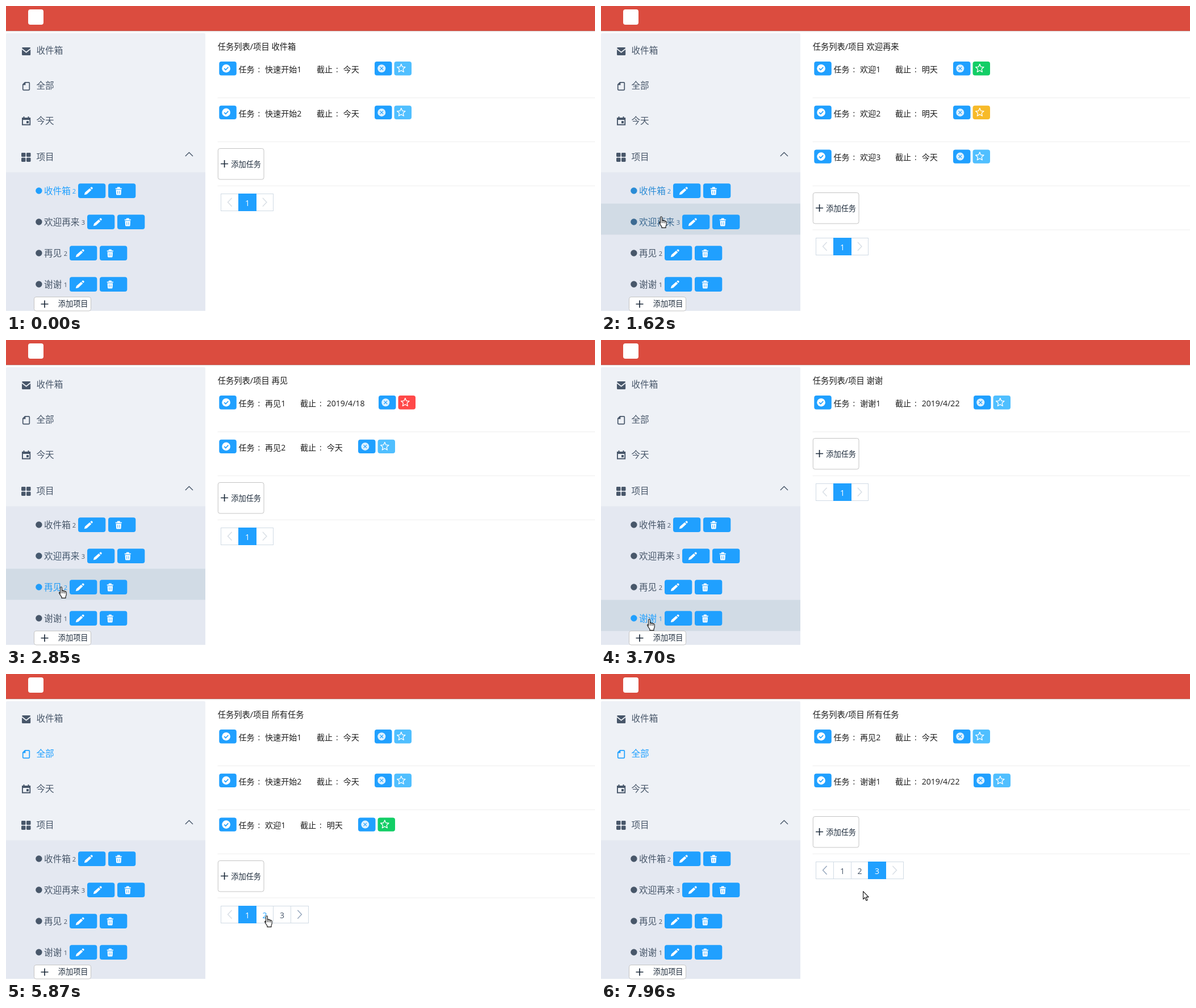
These frames come from a looping animation (1037 by 540 pixels, 8000 ms). An HTML page:

```html
<!DOCTYPE html>
<html lang="zh-CN">
<head>
<meta charset="utf-8">
<title>任务列表</title>
<style>
html, body { margin: 0; width: 100%; height: 100%; overflow: hidden; background: #fff; }
svg { display: block; width: 1037px; height: 540px; }
text { font: 14.1px "Open Sans", "Noto Sans CJK SC", "Noto Sans CJK", sans-serif; white-space: pre; }
.title { font-size: 14.3px; }
.side { font-size: 15.6px; font-weight: 300; }
.count { font-size: 11px; }
.button { font-size: 13.2px; }
</style>
</head>
<body>
<svg id="stage" viewBox="0 0 1037 540" lang="zh-CN"></svg>
<script>
const LOOP = 8000;
const BLUE = '#20a0ff', LIGHT = '#4db3ff', SLATE = '#48576a', INK = '#1f2d3d';
const STAR = { low: '#50bfff', ok: '#13ce66', warn: '#f7ba2a', high: '#ff4949' };

const inbox = [['快速开始1', '今天', 'low'], ['快速开始2', '今天', 'low']];
const welcome = [['欢迎1', '明天', 'ok'], ['欢迎2', '明天', 'warn'], ['欢迎3', '今天', 'low']];
const bye = [['再见1', '2019/4/18', 'high'], ['再见2', '今天', 'low']];
const thanks = [['谢谢1', '2019/4/22', 'low']];
const all = [...inbox, ...welcome, ...bye, ...thanks];
const projects = [['收件箱', 2], ['欢迎再来', 3], ['再见', 2], ['谢谢', 1]];

const views = [
  { at: 0, active: 0, title: '收件箱', tasks: inbox, page: 1, pages: 1 },
  { at: 1620, active: 1, title: '欢迎再来', tasks: welcome, page: 1, pages: 1 },
  { at: 2700, active: 2, title: '再见', tasks: bye, page: 1, pages: 1 },
  { at: 3540, active: 3, title: '谢谢', tasks: thanks, page: 1, pages: 1 },
  ...[4250, 6730, 7420].map((at, i) => ({
    at, active: 'all', title: '所有任务', tasks: all.slice(i * 3, i * 3 + 3), page: i + 1, pages: 3
  }))
];

// Pointer: start, end and number of steps of each move, then its path as [time, x, y]
const moves = [[300, 1080, 11], [1160, 1240, 2], [2020, 2550, 8], [2700, 3240, 8], [4710, 5480, 11],
  [5550, 5870, 5], [6180, 6330, 3], [6500, 6580, 2], [7650, 7960, 5]];
const path = [[300, 774, 520], [600, 352, 446], [700, 262, 424], [846, 147, 382], [930, 125, 372],
  [1080, 111, 367], [1240, 102, 371], [1944, 102, 371], [2171, 104, 404], [2550, 93, 434],
  [2850, 93, 434], [3240, 81, 492], [4710, 815, 484], [5018, 597, 424], [5250, 520, 424],
  [5480, 484, 424], [5870, 455, 426], [6105, 455, 426], [6330, 513, 438], [6425, 513, 438],
  [6580, 516, 423], [7575, 516, 423], [7960, 461, 383]];
// Hovered project rows: row, enter, leave
const hovers = [[2, 600, 760], [1, 740, 2170], [2, 2180, 3040], [3, 3060, 4250]];

const clamp = v => Math.max(0, Math.min(1, v));
const rgb = hex => [1, 3, 5].map(i => parseInt(hex.slice(i, i + 2), 16));
const mix = (a, b, k) => {
  const p = rgb(a), q = rgb(b);
  return `rgb(${p.map((v, i) => Math.round(v + (q[i] - v) * k))})`;
};
const rect = (x, y, w, h, fill, r = 0, extra = '') =>
  `<rect x="${x}" y="${y}" width="${w}" height="${h}" rx="${r}" fill="${fill}" ${extra}/>`;
const text = (x, y, s, fill = '#1c1c1c', cls = '', extra = '') =>
  `<text x="${x}" y="${y}" fill="${fill}" class="${cls}" ${extra}>${s}</text>`;
const fillPath = (d, fill) => `<path d="${d}" fill="${fill}"/>`;
const line = (d, color, w) => `<path d="${d}" fill="none" stroke="${color}" stroke-width="${w}"/>`;
const at = (x, y, s) => `<g transform="translate(${x} ${y})">${s}</g>`;
const plus = (x, y) => line(`M${x - 6.5} ${y}h13M${x} ${y - 6.5}v13`, INK, 1.7);

const starPath = 'M' + Array.from({ length: 10 }, (_, i) => {
  const r = i % 2 ? 3.5 : 7.6, a = i * Math.PI / 5;
  return `${(r * Math.sin(a)).toFixed(2)} ${(-r * Math.cos(a)).toFixed(2)}`;
}).join('L') + 'Z';

const icon = {
  check: '<circle r="7.3" fill="#fff"/>' + line('M-3.4 0L-.8 2.6L3.7-2.2', BLUE, 1.7),
  cross: '<circle r="7" fill="#fff" opacity=".85"/>' + line('M-2.8-2.8L2.8 2.8M2.8-2.8L-2.8 2.8', BLUE, 1.1),
  star: `<path d="${starPath}" fill="none" stroke="#fff" stroke-width="1.3" stroke-linejoin="round"/>`,
  pencil: fillPath('M-7.5 6.8L-6.3 2.5L2-4.6L5-1.6L-3 5.8ZM3-5.4L4.6-6.8Q5.6-7.4 6.6-6.4L7.2-5.7Q7.8-4.7 7-3.9L5.8-2.6Z', '#fff'),
  trash: fillPath('M-5.5-5h3V-6.5Q-2.5-7-2-7H2Q2.5-7 2.5-6.5V-5h3v1.8h-11ZM-4.7-2.2H4.7L4.2 6.2Q4.1 7 3.3 7H-3.3Q-4.1 7-4.2 6.2Z', '#fff') +
    line('M-1.6 0v5M1.6 0v5', BLUE, .9),
  mail: fillPath('M28 74.5Q28 73 29.5 73h12.2Q43.2 73 43.2 74.5L35.6 80.6ZM28 76.8L35.6 82.8L43.2 76.8V85.5Q43.2 87 41.7 87H29.5Q28 87 28 85.5Z', SLATE),
  calendar: fillPath('M28 197h2.5v-2h2v2h6v-2h2v2h2.7v13.5H28ZM29.9 201v7.6h11.4V201Z', SLATE) + rect(36, 203, 4, 4, SLATE),
  grid: [[27, 259], [36, 259], [27, 267.8], [36, 267.8]].map(([x, y]) => rect(x, y, 7.5, 7.2, SLATE, 1.4)).join('')
};

function activeAmount(id, t) {
  const i = views.findLastIndex(v => v.at <= t);
  const now = views[i].active === id ? 1 : 0;
  if (i === 0 || views[i].active === 'all') return now;
  const before = views[i - 1].active === id ? 1 : 0;
  return before + (now - before) * clamp((t - views[i].at + 60) / 220);
}

function rowHover(row, t) {
  if (t >= 4250) return 0;
  return hovers.filter(h => h[0] === row && t >= h[1]).reduce((sum, [, on, off]) =>
    Math.max(sum, clamp((Math.min(t, off) - on) / 300) - Math.max(0, t - off) / 300), 0);
}

function pointer(t) {
  if (t < 300 || (t >= 4250 && t < 4710)) return null;
  const [start, end, n] = moves.findLast(m => m[0] <= t);
  const dt = (end - start) / (n - 1);
  const s = start + Math.min(n - 1, Math.floor((t - start) / dt + .25)) * dt;
  const i = path.findLastIndex(p => p[0] <= s + .01);
  const a = path[i], b = path[i + 1] || a;
  const k = b === a ? 0 : clamp((s - a[0]) / (b[0] - a[0]));
  const x = a[1] + (b[1] - a[1]) * k, y = a[2] + (b[2] - a[2]) * k;
  return { x, y, hand: x < 351 || (x < 530 && t < 7650) };
}

function drawPointer(p) {
  if (!p) return '';
  const d = p.hand
    ? 'M2.6 12.8V2.3Q2.6.7 4 .7Q5.4.7 5.4 2.3V8Q5.5 6.8 6.7 6.9Q8 7 8 8.4Q8.3 7.4 9.3 7.6Q10.6 7.8 10.6 9.2Q11 8.4 12 8.7Q13.2 9 13.2 10.4V14Q13.2 16 12 17.8V20.4H4.9V18.2Q3.4 16.4 2 13.9L.7 11.8Q.2 10.7 1.1 10.4Q1.9 10.2 2.6 11.2'
    : 'M.6.6V14.4L3.7 11.5L6 16.8L8.2 15.9L5.9 10.6H10.2Z';
  const inner = p.hand ? line('M5.4 8v4M8 8.6v3.6M10.6 9.4v3', '#111', .9) : '';
  return at(Math.round(p.x), Math.round(p.y),
    `<path d="${d}" fill="#fff" stroke="#111" stroke-width="1.1" stroke-linejoin="round"/>${inner}`);
}

function sidebar(t, over) {
  const allColor = mix(SLATE, BLUE, activeAmount('all', t));
  let s = rect(0, 48, 351, 490, '#eef1f6', 2) + rect(0, 293.5, 351, 244.5, '#e4e8f1');
  s += icon.mail + text(53.5, 84, '收件箱', SLATE, 'side');
  s += line('M33.5 134.8H40Q41.3 134.8 41.3 136V147Q41.3 148.3 40 148.3H31Q29.7 148.3 29.7 147V138.6Z', allColor, 1.7) +
    fillPath('M29 139.6L34.4 134V139.6Z', allColor) + text(53.5, 146, '全部', allColor, 'side');
  s += icon.calendar + text(53.5, 208, '今天', SLATE, 'side');
  s += icon.grid + text(53.5, 271.5, '项目', SLATE, 'side') + line('M315.8 265L322.4 258.6L329 265', SLATE, 1.4);

  projects.forEach(([name, count], i) => {
    const y = Math.round(326 + i * 54.9), color = mix(SLATE, BLUE, activeAmount(i, t));
    const x = Math.floor(81 + name.length * 15.5);
    const h = rowHover(i, t);
    if (h > 0) s += rect(0, y - 32.4, 351, 54.9, '#d1dbe5', 0, `opacity="${h.toFixed(3)}"`);
    s += `<circle cx="57.9" cy="${y}" r="5.7" fill="${color}"/>`;
    s += text(67, y + 6, name, color, 'side') + text(x - 10.3, y + 5, count, color, 'count');
    ['pencil', 'trash'].forEach((kind, j) => {
      const bx = x + j * 53, by = y - 12.7;
      s += rect(bx, by, 48.3, 25.7, over(bx, by, 48.3, 25.7) ? LIGHT : BLUE, 4);
      s += at(bx + 18.3, y + .4, icon[kind]);
    });
  });
  s += rect(49.5, 513.5, 100, 24.5, '#fff', 3.5, 'stroke="#c4c4c4"') + plus(68, 526);
  return s + text(91.8, 529.5, '添加项目', INK, 'button');
}

function taskRow([name, due, level], i) {
  const y = i * 77.7;
  const dueX = name.length > 3 ? 547 : 518;
  const bx = dueX + (due.length > 2 ? 138 : 102);
  const chip = (x, kind, fill) => rect(x, 98, 30.5, 24.4, fill, 4) + at(x + 12.3, 110.2, icon[kind]);
  return at(0, y.toFixed(1), chip(375.3, 'check', BLUE) +
    text(409.5, 117, '任务') + text(443.5, 117, ':') + text(456, 117, name) +
    text(dueX, 117, '截止') + text(dueX + 34, 117, ':') + text(dueX + 46.7, 117, due) +
    chip(bx, 'cross', BLUE) + chip(bx + 34.5, 'star', STAR[level]) +
    rect(372.5, 161.5, 664.5, 1, '#eee'));
}

function pager(y, page, pages, over) {
  const edge = i => Math.round(378 + i * 30.8);
  const cell = (i, fill, color) =>
    rect(edge(i) + .5, y, edge(i + 1) - edge(i), 30, fill, 0, `stroke="${color}"`);
  let s = '';
  for (let i = 0; i < pages + 2; i++) {
    if (i !== page) s += cell(i, '#fff', '#d1dbe5');
  }
  s += cell(page, BLUE, BLUE);
  for (let i = 0; i < pages + 2; i++) {
    const x = edge(i), w = edge(i + 1) - x, mid = x + .5 + w / 2;
    const hot = over(x, y, w, 30.5);
    if (i === 0 || i === pages + 1) {
      const off = i === 0 ? page === 1 : page === pages;
      const dir = i === 0 ? 1 : -1;
      s += line(`M${mid + 3.6 * dir} ${y + 7.3}l${-7 * dir} 7.5l${7 * dir} 7.5`,
        off ? '#d9dfe6' : hot ? BLUE : '#97a8be', 1.5);
    } else {
      s += text(mid, y + 21.8, i, i === page ? '#fff' : hot ? BLUE : SLATE, '', 'text-anchor="middle"');
    }
  }
  return s;
}

function content(t, over) {
  const view = views.findLast(v => v.at <= t);
  const base = 84.3 + view.tasks.length * 77.7;
  const top = Math.round(base + 11.3) + .5;
  return text(372.7, 77.3, '任务列表/项目 ' + view.title, '#1c1c1c', 'title') + view.tasks.map(taskRow).join('') +
    rect(373.3, top, 80.7, 54.5, '#fff', 3.5, 'stroke="#c4c4c4"') + plus(384.6, top + 27) +
    text(396.3, top + 32, '添加任务', INK, 'button') +
    rect(372.5, (base + 77.2).toFixed(1), 664.5, 1, '#eee') +
    pager(Math.round(base + 91.3) + .5, view.page, view.pages, over);
}

const header = rect(0, 0, 1037, 43, '#db4c3f') + rect(0, 43, 1037, 1, '#c9493d') +
  rect(0, 44, 1037, 1, '#e6dfdf') + rect(0, 45, 1037, 1, '#f6f4f4') + rect(39, 6, 27, 27, '#fff', 4);

const stage = document.getElementById('stage');
let shown = '';

function render(t) {
  const p = pointer(t);
  const over = (x, y, w, h) => !!p && p.x + 3 >= x && p.x + 3 < x + w && p.y + 1 >= y && p.y + 1 < y + h;
  const html = rect(0, 0, 1037, 540, '#fff') + header + sidebar(t, over) + content(t, over) + drawPointer(p);
  if (html !== shown) stage.innerHTML = shown = html;
}

const begin = performance.now();
function tick() {
  render((performance.now() - begin) % LOOP);
  requestAnimationFrame(tick);
}
tick();
</script>
</body>
</html>
```
